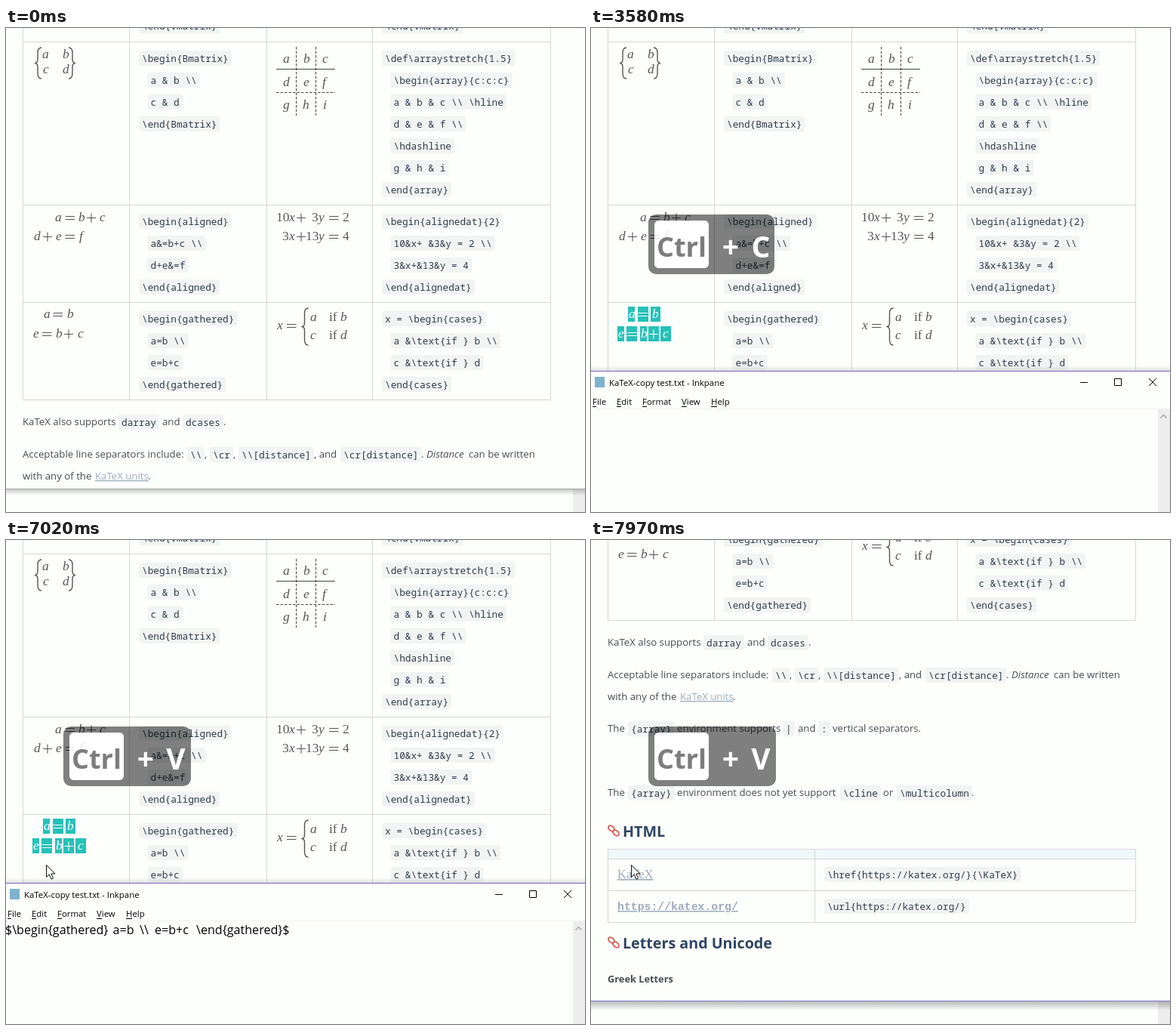
Recreate the animation shown at these times as an HTML page. Size 767 by 641 pixels, loop 8 s.

```html
<!DOCTYPE html>
<html lang="en">
<head>
<meta charset="utf-8">
<title>Copying a formula</title>
<style>
  html, body { margin: 0; width: 100%; height: 100%; overflow: hidden; background: #fdfffd; }
  svg { display: block; }
  text { font: 13.2px "Open Sans", sans-serif; fill: #484b50; white-space: pre; }
  .code { font: 12.75px "Noto Sans Mono", monospace; fill: #303b4b; }
  .math { font: 17.4px "Liberation Serif", serif; fill: currentColor; }
  .var { font-style: italic; }
  .link { fill: #9dabbd; text-decoration: underline; }
  .italic { font-style: italic; }
  .tt { font: bold 14.8px "Liberation Mono", monospace; }
  .head { font-weight: 700; font-size: 19.7px; fill: #2f4562; }
  .strong { font-weight: 700; font-size: 12.8px; }
  .ui { font-size: 11.4px; fill: #000; }
  .typed { font-size: 16.1px; fill: #000; }
  .key { font-weight: 700; font-size: 36px; text-anchor: middle; }
  .big { font-size: 39px; fill: #fff; }
</style>
</head>
<body>
<svg id="stage" width="767" height="641"></svg>
<script>
const raw = String.raw;
const escapeText = s => s.replace(/&/g, '&amp;').replace(/</g, '&lt;');
const rect = (x, y, w, h, fill, extra = '') =>
  `<rect x="${x}" y="${y}" width="${w}" height="${h}" fill="${fill}" ${extra}/>`;
const text = (x, y, s, cls = '') => `<text x="${x}" y="${y}" class="${cls}">${escapeText(s)}</text>`;
const stroke = (d, color = 'currentColor', width = 1.1, extra = '') =>
  `<path d="${d}" fill="none" stroke="${color}" stroke-width="${width}" ${extra}/>`;

const CHAR = 7.65;
const code = (x, mid, s) =>
  rect(x - 4, mid - 10, s.length * CHAR + 8, 20, '#f2f4f3', 'rx="2"') + text(x, mid + 4.5, s, 'code');

// Lines are separated by "|"; a leading space indents.
const block = (x, mid, s) => s.split('|').map((line, i) =>
  code(x + (line[0] === ' ' ? 11.5 : 0), mid + 29 * i, line.trim())).join('');

// Tokens are "x:glyphs"; operators are drawn at the width of math type.
const math = (y, tokens) => tokens.split(' ').map(token => {
  const [x, s] = token.split(':'), axis = y - 4.5;
  if (s === '=') return stroke(`M${x} ${axis - 2}h12.5m0 4h-12.5`);
  if (s === '+') return stroke(`M${x} ${axis}h12m-6 -6v12`);
  return text(x, y, s, /^[a-z]$/.test(s) ? 'math var' : 'math');
}).join('');

const brace = (x, top, bottom, dir) => {
  const mid = (top + bottom) / 2, tip = x + 5 * dir;
  return stroke(`M${tip} ${top}Q${x} ${top} ${x} ${top + 7}V${mid - 5}Q${x} ${mid} ${x - 4 * dir} ${mid}` +
    `Q${x} ${mid} ${x} ${mid + 5}V${bottom - 7}Q${x} ${bottom} ${tip} ${bottom}`, 'currentColor', 1.4);
};

const grid = (xs, ys, top) => {
  const right = xs[xs.length - 1], bottom = ys[ys.length - 1];
  return ys.map(y => rect(xs[0], y, right - xs[0] + 1, 1, '#d6d8d7')).join('') +
    xs.map(x => rect(x, top, 1, bottom - top, '#d6d8d7')).join('');
};

const chain = y => [[27, -3], [33, 3]].map(([x, dy]) =>
  `<ellipse cx="${x}" cy="${y + dy}" rx="4.6" ry="3" transform="rotate(40 ${x} ${y + dy})"
    fill="none" stroke="#d4645f" stroke-width="2"/>`).join('');

const formulas = `<g color="#555">
  ${brace(42, 26, 67, 1)}${math(40, '48:a 75:b')}${math(60, '49:c 75:d')}${brace(88, 26, 67, -1)}
  ${math(46, '367:a 394:b 419:c')}${math(77, '367:d 394:e 419:f')}${math(107, '367:g 393:h 420:i')}
  ${stroke('M358 54.5h78', '#444', 1)}
  ${stroke('M358 85.5h78M384.5 25v91M410.5 25v91', '#444', 1, 'stroke-dasharray="3.5 2"')}
  ${math(256, '65:a 78.5:= 96:b 107:+ 124:c')}${math(281, '37:d 49:+ 66:e 78.5:= 97:f')}
  ${math(256, '358:10 375:x 385:+ 405:3 414:y 428:= 446:2')}
  ${math(281, '366:3 375:x 385:+ 397:13 414:y 428:= 446:4')}
  ${math(399, '359:x 372:=')}${brace(395.5, 371, 420, 1)}
  ${math(388, '403:a 428:if 443:b')}${math(412, '403:c 428:if 443:d')}
</g>`;

const highlight = (y, spans) => spans.map(([x, w]) => rect(x, y, w, 20, '#26c1b8')).join('');
const gathered = `
  <g id="row1"><g class="mark">${highlight(369, [[49, 9], [62, 14], [79, 13]])}</g>
    ${math(384, '50:a 62.5:= 81:b')}</g>
  <g id="row2"><g class="mark">${highlight(395, [[35, 9], [47, 14], [65, 9], [76, 14], [92, 14]])}</g>
    ${math(410, '36:e 48:= 66:b 77:+ 95:c')}</g>`;

const codeBlocks =
  block(180, -3, raw`\end{vmatrix}`) + block(502, -3, raw`\end{Vmatrix}`) +
  block(180, 40, raw`\begin{Bmatrix}| a & b \\| c & d|\end{Bmatrix}`) +
  block(502, 40, raw`\def\arraystretch{1.5}| \begin{array}{c:c:c}| a & b & c \\ \hline| d & e & f \\| \hdashline| g & h & i|\end{array}`) +
  block(180, 256, raw`\begin{aligned}| a&=b+c \\| d+e&=f|\end{aligned}`) +
  block(502, 256, raw`\begin{alignedat}{2}| 10&x+ &3&y = 2 \\| 3&x+&13&y = 4|\end{alignedat}`) +
  block(180, 385, raw`\begin{gathered}| a=b \\| e=b+c|\end{gathered}`) +
  block(502, 385, raw`x = \begin{cases}| a &\text{if } b \\| c &\text{if } d|\end{cases}`);

const prose =
  text(22, 526, 'KaTeX also supports') + code(153, 522, 'darray') + text(207, 526, 'and') +
  code(238, 522, 'dcases') + text(288, 526, '.') +
  text(22, 569, 'Acceptable line separators include:') + code(244, 565, raw`\\`) + text(263, 569, ',') +
  code(274, 565, raw`\cr`) + text(301, 569, ',') + code(312, 565, raw`\\[distance]`) +
  text(408, 569, ', and') + code(447, 565, raw`\cr[distance]`) + text(550, 569, '.') +
  text(557, 569, 'Distance', 'italic') + text(613, 569, 'can be written') +
  text(22, 598, 'with any of the') + text(118, 598, 'KaTeX units', 'link') + text(188, 598, '.') +
  text(22, 640, 'The') + code(53, 636, '{array}') + text(114, 640, 'environment supports') +
  code(258, 636, '|') + text(274, 640, 'and') + code(305, 636, ':') + text(320, 640, 'vertical separators.') +
  text(22, 725, 'The') + code(53, 721, '{array}') + text(114, 725, 'environment does not yet support') +
  code(334, 721, raw`\cline`) + text(387, 725, 'or') + code(409, 721, raw`\multicolumn`) + text(504, 725, '.');

const lowerPage =
  chain(771) + text(42, 779, 'HTML', 'head') +
  rect(22, 795, 700, 13, '#f1f8fb') + grid([22, 296, 721], [795, 808, 850, 892], 795) +
  `<text x="35" y="834" class="link" style="font:16.5px 'Liberation Serif',serif">KaTeX</text>` +
  code(313, 829, raw`\href{https://katex.org/}{\KaTeX}`) +
  text(35, 876, 'https://katex.org/', 'link tt') + code(313, 871, raw`\url{https://katex.org/}`) +
  chain(919) + text(42, 927, 'Letters and Unicode', 'head') + text(22, 972, 'Greek Letters', 'strong');

const editor =
  rect(0, 455, 767, 186, '#fdfffd') + rect(0, 504, 767, 1, '#eeefee') +
  rect(751, 505, 16, 136, '#ededed') + stroke('M754.5 516.5l4-4 4 4', '#a9a9a9', 1.5) +
  rect(5, 462, 13, 14, '#7fb2cc') + text(24, 474, 'KaTeX-copy test.txt - Inkpane', 'ui') +
  stroke('M648 469.5h10M693.5 464.5h9v9h-9zM739 464l10 10m0-10l-10 10', '#000', 1) +
  [[2, 'File', 5], [34, 'Edit', 6], [68, 'Format', 6], [120, 'View', 7], [159, 'Help', 8]]
    .map(([x, s, w]) => text(x, 499, s, 'ui') + rect(x, 501, w, 1, '#000')).join('') +
  `<g id="typed">${[[-1, raw`$\begin{gathered}`], [141.5, 'a=b'], [177, raw`\\`], [197, 'e=b+c'],
    [252, raw`\end{gathered}$`]].map(([x, s]) => text(x, 522, s, 'typed')).join('')}</g>` +
  rect(376, 505, 1, 21, '#000', 'id="caret"');

const roundRect = (x, y, w, h, r) => `M${x + r} ${y}h${w - 2 * r}a${r} ${r} 0 0 1 ${r} ${r}v${h - 2 * r}` +
  `a${r} ${r} 0 0 1 ${-r} ${r}h${2 * r - w}a${r} ${r} 0 0 1 ${-r} ${-r}v${2 * r - h}a${r} ${r} 0 0 1 ${r} ${-r}z`;
const shortcut = (id, letter, width) => {
  const cap = roundRect(8, 8, 72, 63, 6);
  return `<g id="${id}"><path d="${roundRect(0, 0, width, 79, 10)}${cap}" fill-rule="evenodd" fill-opacity=".5"/>
    <path d="${cap}" fill="#fff" fill-opacity=".85"/>
    <text x="44" y="56" class="key" style="fill:#7d7d7d">Ctrl</text>
    <text x="109" y="57" class="key big">+</text><text x="149" y="57" class="key big">${letter}</text></g>`;
};

const fade = (id, alpha, y1, y2) => `<linearGradient id="${id}" x1="0" x2="0" y1="${y1}" y2="${y2}">
  <stop stop-opacity="${alpha}"/><stop offset="1" stop-opacity="0"/></linearGradient>`;

document.getElementById('stage').innerHTML = `
  <defs>${fade('softShade', .2, 0, 1)}${fade('deepShade', .27, 0, 1)}${fade('topShade', .13, 1, 0)}
    <clipPath id="pageClip"><rect id="pageArea" width="767" height="610"/></clipPath></defs>
  ${editor}
  <g clip-path="url(#pageClip)">${rect(0, 0, 767, 610, '#fdfffd')}
    <g id="page">${grid([22, 163, 345, 485, 721], [18, 234, 363, 492], -20)}
      ${codeBlocks}${formulas}${gathered}${prose}${lowerPage}</g></g>
  <g id="idleEdge">${rect(0, 610, 767, 1, '#a2a2a2')}${rect(0, 611, 767, 8, 'url(#softShade)')}</g>
  <g id="activeEdge">${rect(0, 610, 767, 1, '#8c7ad6')}${rect(0, 611, 767, 12, 'url(#deepShade)')}</g>
  <g id="editorEdge">${rect(0, 447, 767, 8, 'url(#topShade)')}${rect(0, 454, 767, 1, '#8066c4')}</g>
  ${shortcut('copy', 'C', 167)}${shortcut('paste', 'V', 169)}
  <path id="pointer" d="M.5 .5V16.5L4.2 13 7 19.2 9.6 18 6.9 12H12Z" fill="#fff" stroke="#111"/>`;

const $ = id => document.getElementById(id);
const show = (id, on) => { $(id).style.display = on ? '' : 'none'; };
const place = (id, x, y) => $(id).setAttribute('transform', `translate(${x} ${y})`);
const mix = (a, b, u) => a + (b - a) * u;
const within = (t, a, b) => t >= a && t < b;

// Index of the current step when n changes are spread evenly from a to b.
const step = (t, a, b, n) => Math.max(-1, Math.min(n - 1, Math.floor((t - a) / (b - a) * (n - 1) + .02)));

function pointerAt(t) {
  if (within(t, 510, 3210)) {
    const u = 1 - (1 - step(t, 510, 1040, 9) / 8) ** 2;
    return [mix(235, 75, u), mix(551, 395, u)];
  }
  if (within(t, 3210, 3400)) {
    const u = (step(t, 3210, 3400, 4) + 1) / 4;
    return [mix(75, 85, u), mix(395, 645, u ** 1.4)];
  }
  if (within(t, 5810, 6000)) return [mix(80, 71, step(t, 5810, 6000, 4) / 3), 628 - 14 * step(t, 5810, 6000, 4)];
  if (t >= 6560) {
    const u = 1 - (1 - Math.min(1, step(t, 6560, 7150, 9) / 5)) ** 2;
    return [mix(5, 53, u), mix(426, 430, u)];
  }
  return null;
}

function select(row, on) {
  $(row).setAttribute('color', on ? '#fff' : '#555');
  $(row).querySelector('.mark').style.display = on ? '' : 'none';
}

function draw(t) {
  const editorFront = within(t, 3580, 7070), pageActive = t >= 1270 && !editorFront;
  $('pageArea').setAttribute('height', editorFront ? 455 : 610);
  show('editorEdge', editorFront);
  show('activeEdge', pageActive);
  show('idleEdge', !pageActive && !editorFront);

  const scrollStep = step(t, 7640, 7970, 6);
  place('page', 0, scrollStep < 0 ? 0 : -Math.round(13 + 373 * (scrollStep / 5) ** 1.15));
  select('row1', within(t, 1590, 7150));
  select('row2', within(t, 1430, 7150));

  show('typed', t >= 3700);
  show('caret', within(t, 3580, 4180) || within(t, 4740, 5260) || within(t, 5810, 6310));
  $('caret').setAttribute('x', t < 3700 ? -5 : 376);

  const copyFade = step(t, 6560, 7150, 9) + 1;
  show('copy', t >= 2670 && copyFade < 5);
  $('copy').setAttribute('opacity', 1 - .21 * copyFade);
  place('copy', 76, t < 3700 ? 247 : 153);
  show('paste', t >= 3700);
  place('paste', 76, 247);

  const pointer = pointerAt(t);
  show('pointer', pointer);
  if (pointer) place('pointer', Math.round(pointer[0]), Math.round(pointer[1]));
}

const start = performance.now();
function tick() {
  draw((performance.now() - start) % 8000);
  requestAnimationFrame(tick);
}
tick();
</script>
</body>
</html>
```
